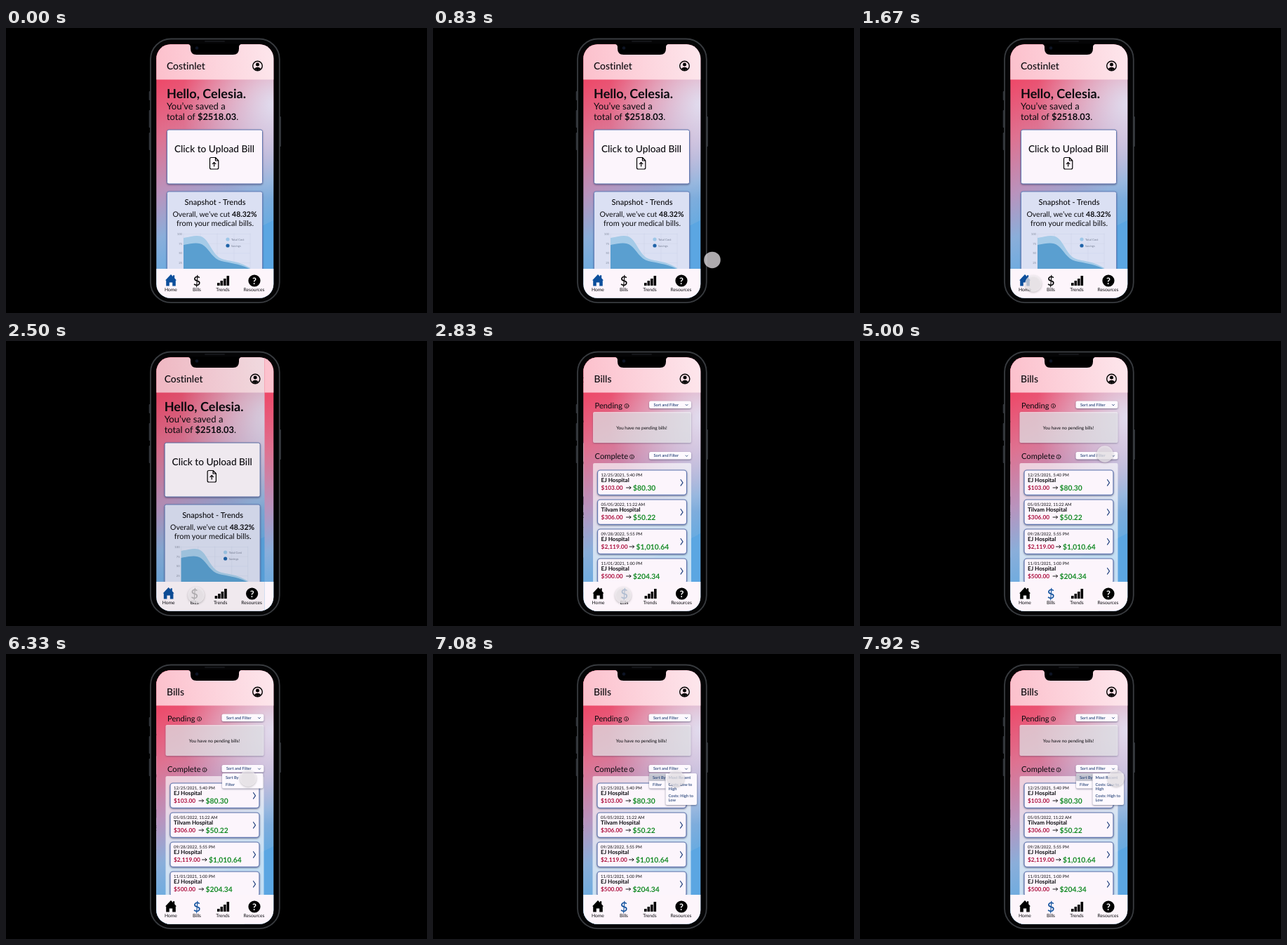
Animation, 600 px wide and 406 px high, one loop 8000 ms. Source, as an HTML page:

```html
<!DOCTYPE html>
<html lang="en">
<head>
<meta charset="utf-8">
<title>Medical bill app demo</title>
<style>
  html, body { margin: 0; width: 100%; height: 100%; overflow: hidden; background: #000; }
  svg { display: block; width: 100vw; height: 100vh; font-family: Lato, "Open Sans", sans-serif; font-variant-ligatures: none; text-rendering: geometricPrecision; }
  .mid { text-anchor: middle; }
  .end { text-anchor: end; }
  .medium { font-weight: 500; }
  .bold { font-weight: 700; }
  .line { fill: none; stroke: #000; stroke-linecap: round; stroke-linejoin: round; }
  .navy { font-weight: 500; }
  .shadow { filter: drop-shadow(0 1.5px 1.2px rgba(30, 35, 70, .5)); }
  .card { fill: #fcf5fc; stroke: #6278b2; }
</style>
</head>
<body>
<svg viewBox="0 0 600 406">
  <defs>
    <linearGradient id="sky" gradientUnits="userSpaceOnUse" x1="214" y1="73" x2="330" y2="300">
      <stop offset="0" stop-color="#ee4767"/>
      <stop offset=".3" stop-color="#de7291"/>
      <stop offset=".58" stop-color="#b993bd"/>
      <stop offset=".8" stop-color="#8aaeda"/>
      <stop offset="1" stop-color="#6aabe0"/>
      <stop offset="1.25" stop-color="#5ba6e2"/>
    </linearGradient>
    <radialGradient id="glow" gradientUnits="userSpaceOnUse" cx="385" cy="108" r="135">
      <stop offset="0" stop-color="#e4ecfb" stop-opacity=".88"/>
      <stop offset=".5" stop-color="#e4ecfb" stop-opacity=".46"/>
      <stop offset="1" stop-color="#e4ecfb" stop-opacity="0"/>
    </radialGradient>
    <linearGradient id="blush" gradientUnits="userSpaceOnUse" x1="214" y1="60" x2="381" y2="40">
      <stop offset="0" stop-color="#fcc0cc"/>
      <stop offset="1" stop-color="#fde6ec"/>
    </linearGradient>
    <clipPath id="screen"><rect x="214.3" y="23.3" width="167" height="361.5" rx="20"/></clipPath>
  </defs>

  <rect width="600" height="406"/>
  <g fill="#303338">
    <rect x="203.700" y="90" width="3" height="13" rx="1"/>
    <rect x="203.700" y="117" width="3" height="25" rx="1"/>
    <rect x="203.700" y="149" width="3" height="25" rx="1"/>
    <rect x="389" y="126" width="3" height="43" rx="1"/>
  </g>
  <rect x="206" y="15.500" width="183.800" height="375.700" rx="29" fill="#050506" stroke="#383b3f" stroke-width="1.800"/>

  <g clip-path="url(#screen)">
    <g id="home"></g>
    <rect id="dim" x="214" y="23" width="168" height="362" opacity="0"/>
    <g id="bills"></g>
  </g>
  <path d="M258 22.500Q263 23 263 27v2.500q0 8.500 8.500 8.500h52q8.500 0 8.500-8.500V27q0-4 5-4.500z"/>
  <rect x="283" y="18" width="29" height="2" rx="1" fill="#141518"/>
  <circle cx="272" cy="28.500" r="2.300" fill="#0d1424"/>

  <circle id="pointer" r="11.800" fill="#f6f2f6" fill-opacity=".7"
    style="filter:drop-shadow(0 1px 1.500px rgba(0,0,0,.35))"/>
</svg>

<script>
const LOOP = 8000, SCREEN = 168;
const SLIDE_AT = 2490, SLIDE_TIME = 400, MENU_AT = 5350, SUBMENU_AT = 6850;
const NAVY = '#17366f', INK = '#0b0b0f';
const $ = id => document.getElementById(id);

const text = (x, y, size, str, cls = '', fill = INK) =>
  `<text x="${x}" y="${y}" font-size="${size}" class="${cls}" fill="${fill}">${str}</text>`;
const box = (x, y, w, h, r, attrs) =>
  `<rect x="${x}" y="${y}" width="${w}" height="${h}" rx="${r}" ${attrs}/>`;
const line = (d, width, color = '#000') =>
  `<path d="${d}" class="line" style="stroke:${color}" stroke-width="${width}"/>`;
const menuText = (x, y, str) => text(x, y, 5.7, str, 'navy', NAVY);

function nav(active) {
  const tint = name => name === active ? '#0d4f9c' : '#000';
  const bars = [4, 7, 10, 14].map((h, i) => box(301 + i * 4.5, 367 - h, 3.6, h, .5, '')).join('');
  return box(214, 343, 168, 43, 0, 'fill="#fdf5fb"') +
    `<path d="M227 359.500l8-8.500 3 3v-1.800h2.200v4.100l2.800 3.200h-1.200v8h-4.600v-5h-4.400v5h-4.600v-8z" fill="${tint('Home')}"/>` +
    text(272, 367, 18.5, '$', 'mid medium', tint('Bills')) + bars +
    '<circle cx="354" cy="360" r="8.600"/>' + text(354, 364.6, 13, '?', 'mid bold', '#fff') +
    [['Home', 235], ['Bills', 272], ['Trends', 309], ['Resources', 353.5]]
      .map(([name, x]) => text(x, 374.5, 6.7, name, 'mid')).join('');
}

function page(title, content, active) {
  return box(214, 23, 168, 362, 0, 'fill="url(#sky)"') +
    box(214, 23, 168, 362, 0, 'fill="url(#glow)"') + content +
    box(214, 23, 168, 50.5, 0, 'fill="url(#blush)"') +
    text(229, 59, 13.9, title, 'medium') +
    '<circle cx="358.500" cy="54" r="6.800" class="line" stroke-width="1.400"/>' +
    '<circle cx="358.500" cy="52" r="2.500"/><path d="M353.800 58q4.700-4.500 9.400 0q-4.700 4-9.400 0z"/>' +
    nav(active);
}

function homeContent() {
  const scale = [100, 75, 50, 25].map((n, i) => {
    const y = 293.5 + i * 13.7;
    return text(251, y + 1.5, 4.2, n, 'end', '#858ca0') +
      line(`M253 ${y}H348`, .35, '#c6cde4');
  }).join('');
  const columns = [253, 277, 301, 325, 348].map(x => line(`M${x} 293V343`, .35, '#c6cde4')).join('');
  const legend = (y, color, name) =>
    `<circle cx="316" cy="${y}" r="2.600" fill="${color}"/>` + text(321, y + 1.5, 4.2, name, '', '#777f95');
  return text(229, 100, 18.1, 'Hello, Celesia.', 'bold') +
    text(229, 116, 13.1, 'You’ve saved a') +
    text(229, 131, 12.9, 'total of <tspan class="bold">$2518.03</tspan>.') +
    box(229.5, 145, 136, 77, 2.5, 'class="card shadow"') +
    text(297, 177, 13.7, 'Click to Upload Bill', 'mid medium') +
    line('M292.500 184.500h6l4.300 4.500v10q0 2-2 2h-8.300q-2 0-2-2v-12.500q0-2 2-2zM298.500 184.500v4.500h4.300M296.600 197v-5.500M294.300 193.600l2.300-2.300 2.300 2.300', 1.2) +
    box(229.5, 233, 136, 125, 2.5, 'fill="#dbe0f3" stroke="#6682bd" class="shadow"') +
    text(298, 252, 11.1, 'Snapshot - Trends', 'mid medium') +
    text(297.5, 269, 10.5, 'Overall, we’ve cut <tspan class="bold">48.32%</tspan>', 'mid') +
    text(298, 281.5, 10.9, 'from your medical bills.', 'mid') +
    scale + columns +
    '<path d="M253 299C266 297 275 293 283 300S296 325 308 329 330 331 348 342V343H253z" fill="#a5cbe8"/>' +
    '<path d="M253 309C265 307 274 304 282 310S295 329 307 332 330 335 347 343H253z" fill="#5a9fd0"/>' +
    legend(301, '#9ec7e8', 'Total Cost') + legend(310, '#1f63a8', 'Savings');
}

function section(title, y, infoX) {
  return text(230, y + 3.5, 11.2, title) +
    `<circle cx="${infoX}" cy="${y + .5}" r="3" class="line" stroke-width=".700"/>` +
    line(`M${infoX} ${y + .3}v1.700M${infoX} ${y - 1}v.1`, .8) +
    box(307.5, y - 6.5, 60, 10.5, 2.5, 'fill="#fdf9fe" class="shadow"') +
    menuText(314, y + .8, 'Sort and Filter') +
    line(`M359.500 ${y - 1.5}l1.500 1.500 1.500-1.500`, .8, NAVY);
}

function bill([date, place, before, after, shift = 0], i) {
  const y = 184 + i * 42;
  return box(234, y, 127, 35.3, 4, 'class="card shadow" stroke-width="1.2"') +
    text(239, y + 8.6, 6, date) +
    text(239, y + 17, 8.1, place, 'bold') +
    text(239, y + 28, 8.4, before, 'bold', '#ad1240') +
    line(`M${275 + shift} ${y + 25}h6.500m-2-2l2 2-2 2`, .9) +
    text(284.5 + shift, y + 28.5, 10.3, after, 'bold', '#128a24') +
    line(`M352.500 ${y + 13.5}l3 4.300-3 4.300`, 1.2, '#24427f');
}

function billsContent() {
  const rows = [
    ['12/25/2021, 5:40 PM', 'EJ Hospital', '$103.00', '$80.30'],
    ['05/05/2022, 11:22 AM', 'Tilvam Hospital', '$306.00', '$50.22'],
    ['09/28/2022, 5:55 PM', 'EJ Hospital', '$2,119.00', '$1,010.64', 4.5],
    ['11/01/2021, 1:00 PM', 'EJ Hospital', '$500.00', '$204.34'],
  ];
  const options = [['Most Recent', 178], ['Costs: Low to', 188], ['High', 194], ['Costs: High to', 203.5], ['Low', 209.5]];
  return section('Pending', 92, 275.5) +
    box(227.5, 101, 140, 44, 2, 'fill="#fff" fill-opacity=".64" class="shadow"') +
    text(297, 125.5, 6.4, 'You have no pending bills!', 'mid') +
    section('Complete', 164.5, 283) +
    box(227.5, 174, 140, 180, 2, 'fill="#fff" fill-opacity=".64"') +
    rows.map(bill).join('') +
    '<g id="menu">' + box(308, 170, 58.5, 21.5, 2, 'fill="#fdf9fe" class="shadow"') +
    '<g id="submenu">' + box(308, 170.5, 24, 10.5, 1, 'fill="#c4c5d0"') +
    box(331.5, 170, 44.5, 45, 2, 'fill="#fdf9fe" class="shadow"') +
    options.map(([name, y]) => menuText(335.5, y, name)).join('') + '</g>' +
    menuText(313, 178, 'Sort By') + menuText(313, 188, 'Filter') + '</g>';
}

$('home').innerHTML = page('Costinlet', homeContent(), 'Home');
$('bills').innerHTML = page('Bills', billsContent(), 'Bills');

// Pointer stops: time, x, y
const stops = [
  [150, 625, 280], [1350, 247, 364], [1670, 247, 364], [2250, 271, 362],
  [3100, 271, 362], [3600, 270, 364], [3830, 270, 364], [4800, 349, 161],
  [5500, 349, 161], [6100, 345, 177], [6950, 345, 177], [7800, 365, 177], [LOOP, 365, 177],
];
const clamp = u => Math.min(1, Math.max(0, u));
const smooth = u => u * u * (3 - 2 * u);

function pointerAt(t) {
  const next = Math.max(1, stops.findIndex(s => s[0] > t));
  const [t0, x0, y0] = stops[next - 1], [t1, x1, y1] = stops[next];
  const k = smooth(clamp((t - t0) / (t1 - t0)));
  return [x0 + (x1 - x0) * k, y0 + (y1 - y0) * k];
}

function draw() {
  const t = performance.now() % LOOP;
  const slide = 1 - (1 - clamp((t - SLIDE_AT) / SLIDE_TIME)) ** 3;
  $('home').setAttribute('transform', `translate(${-SCREEN * .25 * slide})`);
  $('bills').setAttribute('transform', `translate(${SCREEN * (1 - slide)})`);
  $('dim').setAttribute('opacity', .18 * Math.sqrt(slide));
  $('menu').style.display = t < MENU_AT ? 'none' : '';
  $('submenu').style.display = t < SUBMENU_AT ? 'none' : '';
  $('pointer').setAttribute('transform', `translate(${pointerAt(t)})`);
  requestAnimationFrame(draw);
}
draw();
</script>
</body>
</html>
```
